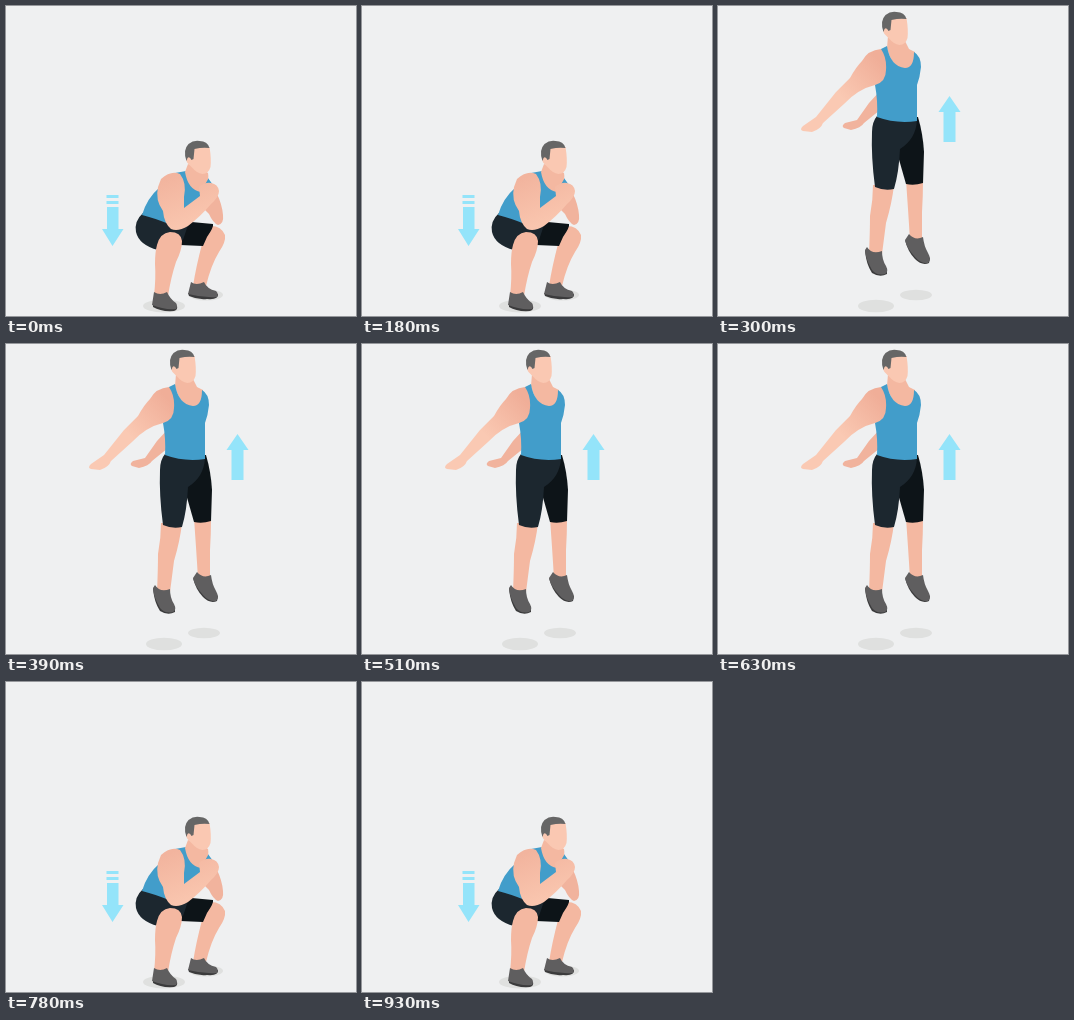
Recreate the animation shown at these times as an HTML page. Size 350 by 310 pixels, loop 0.96 s.

```html
<!DOCTYPE html>
<html lang="en">
<head>
<meta charset="utf-8">
<title>Squat jump</title>
<style>
  html, body { margin: 0; width: 100%; height: 100%; overflow: hidden; background: #eff0f1; }
  svg { display: block; width: 350px; height: 310px; }
  .skin { fill: #f4b8a1; }
  .shade { fill: #f1b39d; }
  .face { fill: #fac8b2; }
  .top { fill: #429dca; }
  .near { fill: #1c272f; }
  .far { fill: #0d1418; }
  .hair { fill: #666; }
  .shoe { fill: #5f5e5f; }
  .sole { fill: #3b3b3c; }
  .shadow { fill: #dfe0df; }
  .arrow { fill: #94e4fa; }
  .squat { animation: squat 960ms step-end infinite; }
  .jump { animation: jump 960ms step-end infinite; }
  @keyframes squat { 0%, 71.875% { opacity: 1; } 21.875% { opacity: 0; } 100% { opacity: 1; } }
  @keyframes jump { 0%, 71.875% { opacity: 0; } 21.875% { opacity: 1; } 100% { opacity: 0; } }
</style>
</head>
<body>
<svg viewBox="0 0 350 310">
  <defs>
    <linearGradient id="arm" gradientUnits="userSpaceOnUse" x1="162" y1="55" x2="122" y2="90">
      <stop offset="0" stop-color="#f0ae98"/>
      <stop offset="1" stop-color="#fac9b3"/>
    </linearGradient>
    <linearGradient id="bent" gradientUnits="userSpaceOnUse" x1="160" y1="172" x2="178" y2="218">
      <stop offset="0" stop-color="#f2b49e"/>
      <stop offset="1" stop-color="#f9c5ae"/>
    </linearGradient>
    <g id="head">
      <path class="face" d="M2 15 L9 6 L25 7 Q27 19 26 27 Q24 34 18 34 Q12 33 8 28 L3 23 Q1 20 2 15Z"/>
      <path class="hair" d="M2 21 Q-2 10 4 4 Q9 0 15 1 Q23 1 25 8 Q18 7 10 9 L9 19 L7 20 Q5 16 3 18Z"/>
    </g>
  </defs>

  <g class="squat">
    <path class="arrow" d="M100.500 189h12v3h-12Z M100.500 195h12v3h-12Z M101 201h11.500v22h5l-11 17l-10.500 -17h5Z"/>
    <ellipse class="shadow" cx="158" cy="300" rx="21" ry="6.500"/>
    <ellipse class="shadow" cx="200" cy="289" rx="17" ry="5.500"/>

    <path class="skin" d="M203 220 Q215 219 219 229 Q220 236 213 246 Q205 259 200 280 L187 280 Q190 261 196 238Z"/>
    <path class="sole" d="M182 287 L183 290 Q192 294 201 293 Q213 294 212 288Z"/>
    <path class="shoe" d="M185 276 Q190 280 198 276 Q201 283 210 285 Q213 288 211 291 Q197 292 182 288Z"/>
    <path class="far" d="M164 214 L207 218 Q208 221 201 231 L197 240 L174 239Z"/>
    <path class="near" d="M137 207 Q128 215 130 226 Q133 239 152 244 Q155 235 163 229 L177 234 L183 216 L158 213Z"/>
    <path class="skin" d="M151 239 Q154 227 164 226 Q175 226 176 235 Q176 244 170 256 Q165 271 162 290 L148 290 Q150 272 149 258 Q149 246 151 239Z"/>
    <path class="sole" d="M147 297 L147 301 Q155 306 168 305 Q172 304 171 300Z"/>
    <path class="shoe" d="M148 286 Q154 290 161 286 Q164 293 170 297 Q172 300 170 303 Q158 304 146 299Z"/>

    <path class="shade" d="M202 175 Q208 178 211 188 Q216 198 217 209 Q218 218 212 219 Q207 217 203 208 L195 200Z"/>
    <path class="top" d="M169 167 L180 165 Q190 176 202 172 L207 179 L198 197 L181 217 L163 218 Q148 212 136 209 Q141 192 154 181Z"/>
    <path class="skin" d="M182 158 L194 162 L202 167 Q203 173 201 175 L195 186 Q182 184 179 166Z"/>
    <use href="#head" x="178.500" y="134"/>
    <path fill="url(#bent)" d="M155 173 Q165 164 174 168 Q181 177 178 191 L178 202 L194 190 L193 181 Q199 176 205 177 Q212 178 213 185 Q213 191 205 198 Q195 210 182 220 Q172 226 165 223 Q158 217 157 205 Q149 194 152 181Z"/>
  </g>

  <g class="jump">
    <path class="arrow" d="M231.500 90l11 16h-5v30h-12v-30h-5Z"/>
    <ellipse class="shadow" cx="158" cy="300" rx="18" ry="6.300"/>
    <ellipse class="shadow" cx="198" cy="289" rx="16" ry="5.300"/>

    <path class="shade" d="M162 85 L151 97 L139 114 L127 117 Q123 120 126 122 L133 124 Q143 122 146 117 L162 104Z"/>
    <path class="skin" d="M188 174 L205 174 Q205 190 204 206 L204 235 L192 235 Q191 218 190 203Z"/>
    <path class="skin" d="M155 179 L176 179 Q174 197 168 217 L164 248 L151 248 Q152 225 152 210 Q155 194 155 179Z"/>
    <path class="sole" d="M187 234 Q190 246 197 253 Q204 260 211 257 L212 252Z"/>
    <path class="shoe" d="M191 228 Q197 235 205 231 Q206 240 210 247 Q214 254 210 257 Q203 258 197 251 Q188 241 187 234Z"/>
    <path class="sole" d="M147 244 Q148 258 154 267 Q162 272 169 268 L169 263Z"/>
    <path class="shoe" d="M149 241 Q154 249 164 245 Q164 254 168 260 Q171 266 167 268 Q159 270 154 264 Q147 252 147 244Z"/>

    <path class="far" d="M174 111 L200 111 Q205 128 206 146 L205 177 Q196 180 188 178 L180 150Z"/>
    <path class="near" d="M159 110 L199 114 Q198 133 182 143 Q181 166 176 183 Q166 185 157 181 Q153 151 154 126 Q154 116 159 110Z"/>
    <path class="skin" d="M170 30 L187 35 L191 43 L197 46 Q198 62 189 65 Q174 62 169 42Z"/>
    <path class="top" d="M163 43 L169 40 Q172 60 187 62 Q196 62 196 46 Q203 50 203 61 Q202 71 199 79 L199 115 Q178 118 159 111 Q160 95 157 79 L163 60Z"/>
    <path fill="url(#arm)" d="M163 43 Q150 44 144 55 Q138 61 132 72 L118 86 L98 111 L85 120 Q81 124 85 125 L94 126 Q103 123 105 117 L126 98 Q140 83 157 79 Q168 76 168 64 Q169 52 163 43Z"/>
    <use href="#head" x="163.500" y="5"/>
  </g>
</svg>
</body>
</html>
```
